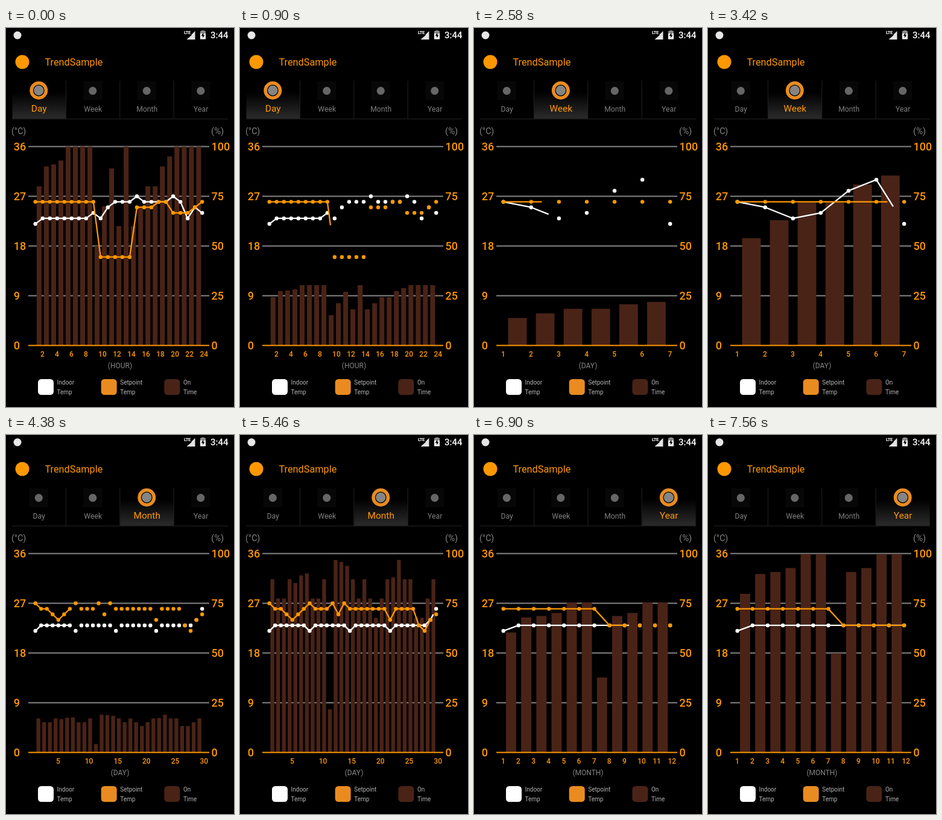
Animation, 378 px wide and 625 px high, one loop 7.62 s. Source, as an HTML page:

```html
<!DOCTYPE html>
<html lang="en">
<head>
<meta charset="utf-8">
<title>Temperature chart</title>
<style>
  html, body { margin: 0; width: 100%; height: 100%; overflow: hidden; background: #000; }
  svg { display: block; width: 378px; height: 625px; font-family: Roboto, sans-serif; }
</style>
</head>
<body>
<svg id="stage" viewBox="0 0 378 625">
  <defs>
    <linearGradient id="glow" x1="0" y1="0" x2="0" y2="1">
      <stop offset="0.3" stop-color="#000"/>
      <stop offset="1" stop-color="#2b2b2b"/>
    </linearGradient>
  </defs>
  <rect width="378" height="625"/>
</svg>
<script>
const LOOP = 7620, STEP = 60, GROW = 1500;
const ORANGE = '#ff9800', AMBER = '#e98b20', BROWN = '#4a2317', GREY = '#858585';
const LEFT = 48.7, RIGHT = 325.2, BASE = 523.5, TOP = 195.5, H = BASE - TOP;
const stage = document.getElementById('stage');

function el(parent, tag, attrs) {
  const node = document.createElementNS('http://www.w3.org/2000/svg', tag);
  for (const key in attrs) node.setAttribute(key, attrs[key]);
  parent.appendChild(node);
  return node;
}
function label(parent, str, x, y, size, fill, attrs) {
  const node = el(parent, 'text', { x, y, fill, 'font-size': size, ...attrs });
  node.textContent = str;
  return node;
}
const group = () => el(stage, 'g', {});
const middle = { 'text-anchor': 'middle' };
const medium = { 'font-weight': 500 };
const rep = (n, v) => Array(n).fill(v);

// Each view: when it appears, when its growth begins, its readings
const views = [
  { name: 'Day', unit: '(HOUR)', from: 0, begin: 652, every: 2,
    indoor: [22, ...rep(7, 23), 24, 23, 25, 26, 26, 26, 27, ...rep(4, 26), 27, 26, 23, 25, 24],
    target: [...rep(9, 26), ...rep(5, 16), 25, 25, 25, 26, 26, 24, 24, 24, 25, 26],
    usage: [80, 90, 91, 93, ...rep(4, 100), 50, 70, 89, 60, 100, 60, 70, 80, 80, 90, 95, ...rep(4, 100)] },
  { name: 'Week', unit: '(DAY)', from: 2340, begin: 2396, every: 1,
    indoor: [26, 25, 23, 24, 28, 30, 22],
    target: rep(7, 26),
    usage: [60, 70, 80, 80, 90, 95] },
  { name: 'Month', unit: '(DAY)', from: 4200, begin: 4230, every: 5,
    indoor: [22, ...rep(6, 23), 22, ...rep(6, 23), 22, ...rep(6, 23), 22, ...rep(6, 23), 24, 26],
    target: [27, 26, 26, 25, 24, 25, 26, 27, 26, 26, 26, 27, 25, 27, ...rep(7, 26), 24, ...rep(4, 26), 23, 22, 24, 25],
    usage: [90, 80, 80, 90, 88, 92, 93, 80, 80, 90, 22.4, 100, 99, 97, 90, 80, 90, 80, 70, 80, 90, 91, 100, 90, 90, 70, 70, 80, 90] },
  { name: 'Year', unit: '(MONTH)', from: 6060, begin: 6144, every: 1,
    indoor: [22, ...rep(11, 23)],
    target: [...rep(7, 26), ...rep(5, 23)],
    usage: [80, 90, 91, 93, 100, 100, 50, 91, 93, 100, 100] }
];

function drawHeader() {
  const g = group();
  el(g, 'circle', { cx: 19, cy: 12, r: 6.5, fill: '#e6e6e6' });
  label(g, 'LTE', 295, 10, 7.5, '#fff', { 'font-weight': 700, 'letter-spacing': -0.5 });
  el(g, 'path', { d: 'M299.5 19L313.5 19V5L307.5 11V12Z', fill: '#e4e4e4' });
  el(g, 'path', { d: 'M322 5.5h2.5V4h4v1.5H331V18.5h-9Z', fill: '#fff' });
  el(g, 'path', { d: 'M322 5.5h2.5V4h4v1.5H331V9h-9Z', fill: '#8a8a8a' });
  el(g, 'path', { d: 'M327.3 7.5L323.6 13H326V16.5L329.6 11.4H327.3Z', fill: '#000' });
  label(g, '3:44', 339, 17.2, 15, '#fff', medium);
  el(g, 'circle', { cx: 27, cy: 56, r: 11.5, fill: ORANGE });
  label(g, 'TrendSample', 64.5, 62, 16.3, ORANGE);
}

function drawFrame() {
  const g = group();
  label(g, '(°C)', 9, 175, 14.2, GREY);
  label(g, '(%)', 340, 175, 15, GREY);
  for (let i = 0; i < 5; i++) {
    const y = TOP + i * H / 4;
    label(g, 36 - 9 * i, 12.7, y + 6.2, 18, ORANGE, medium);
    label(g, 100 - 25 * i, 340.5, y + 6.2, 18, ORANGE, medium);
    if (i < 4) el(g, 'path', { d: `M37 ${y}H337`, stroke: '#858585', 'stroke-width': 1.8 });
  }
  const legend = [['#fff', 'Indoor', 'Temp'], [AMBER, 'Setpoint', 'Temp'], [BROWN, 'On', 'Time']];
  legend.forEach(([fill, a, b], i) => {
    const x = 53 + i * 104.7;
    el(g, 'rect', { x, y: 579, width: 26, height: 26, rx: 5.5, fill });
    label(g, a, x + 31.5, 588, 10, '#b4b4b4');
    label(g, b, x + 31.5, 603.5, 10, '#b4b4b4');
  });
}

function drawTabs(g, active) {
  views.forEach((view, i) => {
    const x = 10.5 + i * 89.4, cx = 54.3 + i * 89.5, on = view === active;
    if (on) {
      el(g, 'rect', { x, y: 87, width: 89, height: 62.5, fill: 'url(#glow)' });
      el(g, 'circle', { cx, cy: 103, r: 12.2, fill: '#000', stroke: AMBER, 'stroke-width': 5.6 });
      el(g, 'circle', { cx, cy: 103, r: 8.2, fill: '#858585' });
    } else {
      el(g, 'rect', { x: cx - 15.5, y: 88, width: 31, height: 31, fill: '#070707' });
      el(g, 'circle', { cx, cy: 103.7, r: 6.6, fill: '#666' });
    }
    if (i) el(g, 'path', { d: `M${x - 0.5} 87V150`, stroke: '#222' });
    label(g, view.name, cx + 0.4, 137.7, on ? 15.5 : 12.2, on ? ORANGE : '#808080', middle);
  });
  el(g, 'path', { d: 'M10 150H368', stroke: '#262626' });
}

function drawSeries(g, data, dx, color) {
  const pts = data.map((v, i) => [LEFT + i * dx, BASE - v / 36 * H]);
  const line = el(g, 'path', {
    d: 'M' + pts.map(p => p.join(' ')).join('L'), pathLength: 1,
    fill: 'none', stroke: color, 'stroke-width': 2.3, 'stroke-linejoin': 'round'
  });
  pts.forEach(([cx, cy]) => el(g, 'circle', { cx, cy, r: 3.2, fill: color }));
  return line;
}

drawHeader();
drawFrame();
const scene = group();
let shown, bars, lines;

function build(view) {
  shown = view;
  scene.replaceChildren();
  drawTabs(scene, view);
  const count = view.indoor.length, dx = (RIGHT - LEFT) / (count - 1), w = dx * 0.67;
  bars = view.usage.map((_, i) =>
    el(scene, 'rect', { x: LEFT + (i + 0.5) * dx - w / 2 + 0.2, width: w, fill: BROWN }));
  el(scene, 'path', { d: `M37 ${BASE}H337`, stroke: ORANGE, 'stroke-width': 1.8 });
  lines = [drawSeries(scene, view.indoor, dx, '#fff'), drawSeries(scene, view.target, dx, ORANGE)];
  for (let n = view.every; n <= count; n += view.every)
    label(scene, n, LEFT + (n - 1) * dx - 3.8, 541.8, 12, ORANGE, medium);
  label(scene, view.unit, 189, 561.3, 12, GREY, middle);
}

function progress(view, t) {
  if (view === views[0] && t < view.begin) return 1;
  const k = Math.min(1, Math.max(0, (t - view.begin) / GROW));
  return 1 - (1 - k) ** 2;
}

function render(ms) {
  const t = Math.floor(ms % LOOP / STEP) * STEP;
  const view = views.filter(v => v.from <= t).pop();
  if (view !== shown) build(view);
  const p = progress(view, t);
  bars.forEach((bar, i) => {
    const h = view.usage[i] / 100 * H * p;
    bar.setAttribute('y', BASE - h);
    bar.setAttribute('height', h);
  });
  lines.forEach(line => {
    line.setAttribute('stroke-dasharray', `${p} 2`);
    line.setAttribute('visibility', p > 0 ? 'visible' : 'hidden');
  });
}

const origin = performance.now();
function tick() {
  render(performance.now() - origin);
  requestAnimationFrame(tick);
}
tick();
</script>
</body>
</html>
```
